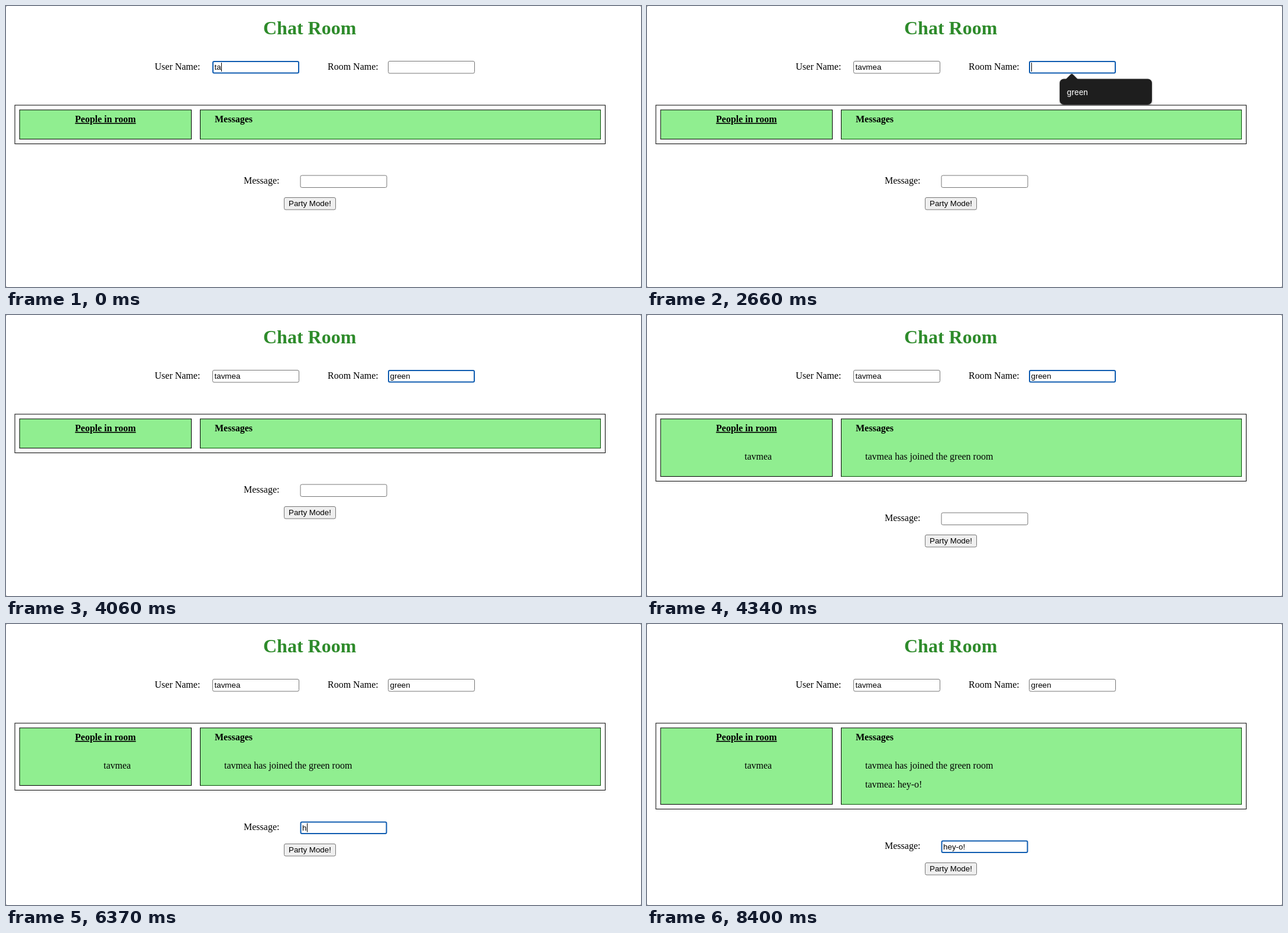
These frames come from a looping animation (1074x476 px, 8.47 s). An HTML page:

```html
<!DOCTYPE html>
<html lang="en">
<head>
<meta charset="utf-8">
<title>Chat Room</title>
<style>
  html, body { margin: 0; width: 100%; height: 100%; overflow: hidden; background: #999; }
  svg { display: block; width: 1074px; height: 476px; }
  text { white-space: pre; }
  .serif { font: 16px "Liberation Serif", Times, serif; }
  .bold { font-weight: bold; }
  .sans { font: 13.333px "Liberation Sans", Arial, sans-serif; }
  .tip { font: 500 13px Inter, sans-serif; fill: #e9e9e9; }
  .panel { fill: #90ee90; stroke: #000; }
</style>
</head>
<body>
<svg id="stage" viewBox="0 0 1074 476"></svg>
<script>
const LOOP = 8470;
const NAME = "tavmea";
const stage = document.getElementById("stage");

function add(tag, attrs, parent = stage, content = "") {
  const node = document.createElementNS("http://www.w3.org/2000/svg", tag);
  set(node, attrs);
  node.textContent = content;
  parent.appendChild(node);
  return node;
}
function set(node, attrs) {
  for (const key in attrs) node.setAttribute(key, attrs[key]);
}
const label = (x, y, content, cls = "serif", parent = stage) =>
  add("text", { x, y, class: cls }, parent, content);
const show = (node, visible) => set(node, { visibility: visible ? "visible" : "hidden" });

function makeField(x, y, parent = stage) {
  const box = add("rect", { fill: "#fff" }, parent);
  const text = label(x + 3.6, y + 15, "", "sans", parent);
  const caret = add("rect", { y: y + 3, width: 1, height: 15, fill: "#000" }, parent);
  return { x, y, box, text, caret };
}
function drawField(field, value, focused, caretOn) {
  const inset = focused ? 1 : 0.5;
  set(field.box, {
    x: field.x + inset, y: field.y + inset,
    width: 147 - 2 * inset, height: 21.5 - 2 * inset,
    rx: focused ? 2 : 2.5,
    stroke: focused ? "#0f5cb0" : "#767676",
    "stroke-width": 2 * inset
  });
  field.text.textContent = value;
  const width = value ? field.text.getComputedTextLength() : 0;
  set(field.caret, { x: Math.round(field.x + 3.6 + width) });
  show(field.caret, caretOn);
}

function makeTip(x, y, content) {
  const tip = add("g", { transform: `translate(${x} ${y})`, style: "filter:drop-shadow(0 1px 1.5px rgba(0,0,0,.4))" });
  add("path", { d: "M10 1 L18.5 -7.5 Q20.5 -9.5 22.5 -7.5 L31 1 Z", fill: "#1e1e1e" }, tip);
  add("rect", { width: 156, height: 43.5, rx: 7, fill: "#1e1e1e" }, tip);
  label(12, 27, content, "tip", tip);
  return tip;
}

// Page
add("rect", { width: 1074, height: 476, rx: 2.5, fill: "#fff" });
const title = label(435, 48, "Chat Room", "serif bold");
title.style.cssText = "font-size:32px;fill:#2e8b2b";
label(251.5, 108, "User Name:");
label(544, 108, "Room Name:");
const user = makeField(349, 93);
const room = makeField(646, 93);

// Panels
const frame = add("rect", { x: 15, y: 168, width: 998.5, fill: "none", stroke: "#000" });
const people = add("rect", { x: 23, y: 176, width: 290.5, class: "panel" });
const messages = add("rect", { x: 328.5, y: 176, width: 677, class: "panel" });
const edge = add("path", { fill: "none", stroke: "#064f06" });
label(116.8, 197, "People in room", "serif bold").style.textDecoration = "underline";
label(353, 197, "Messages", "serif bold");
const joined = add("g", {});
label(165, 245, NAME, "serif", joined);
label(369, 245, `${NAME} has joined the green room`, "serif", joined);
const sent = label(369, 277, `${NAME}: hey-o!`);

// Message form, pushed down as the panels grow
const form = add("g", {});
label(402, 301, "Message:", "serif", form);
const message = makeField(497.5, 286.5, form);
add("rect", { x: 470.5, y: 324.5, width: 87, height: 20.5, rx: 2.5, fill: "#efefef", stroke: "#767676" }, form);
label(478, 339, "Party Mode!", "sans", form);

const roomTip = makeTip(698, 123.5, "green");
const messageTip = makeTip(550, 365.5, "it's going great!");

const between = (t, from, to) => t >= from && t < to;
// Number of characters typed by time t
const typed = (t, times) => times.filter(at => t >= at).length;

function render(t) {
  const userCaret = t < 1400 || between(t, 1890, 2030);
  const roomCaret = between(t, 2030, 2450) || between(t, 2660, 4060) || between(t, 4620, 5180);
  const messageCaret = between(t, 5250, 5670) || between(t, 6160, 7490) || between(t, 7560, 8330);
  const shift = t < 4340 ? 0 : t < 8190 ? 48 : 80;

  drawField(user, NAME.slice(0, 2 + typed(t, [420, 560, 700, 840])), t < 2450, userCaret);
  drawField(room, "green".slice(0, typed(t, [2940, 3010, 3290, 3430, 3570])), between(t, 2030, 5250), roomCaret);
  drawField(message, "hey-o!".slice(0, typed(t, [6300, 6440, 6580, 7000, 7560, 7840])), t >= 5250, messageCaret);
  set(message.caret, { fill: between(t, 5600, 5670) ? "#777" : "#000" });

  set(frame, { height: 65.5 + shift });
  for (const panel of [people, messages]) set(panel, { height: 49.5 + shift });
  set(edge, { d: `M329 ${225.5 + shift} H1005.5 V176.5` });
  set(form, { transform: `translate(0 ${shift})` });

  show(joined, t >= 4340);
  show(sent, t >= 8190);
  show(roomTip, between(t, 2450, 3570));
  show(messageTip, between(t, 5600, 6300));
}

const start = performance.now();
function tick() {
  render((performance.now() - start) % LOOP);
  requestAnimationFrame(tick);
}
tick();
</script>
</body>
</html>
```
